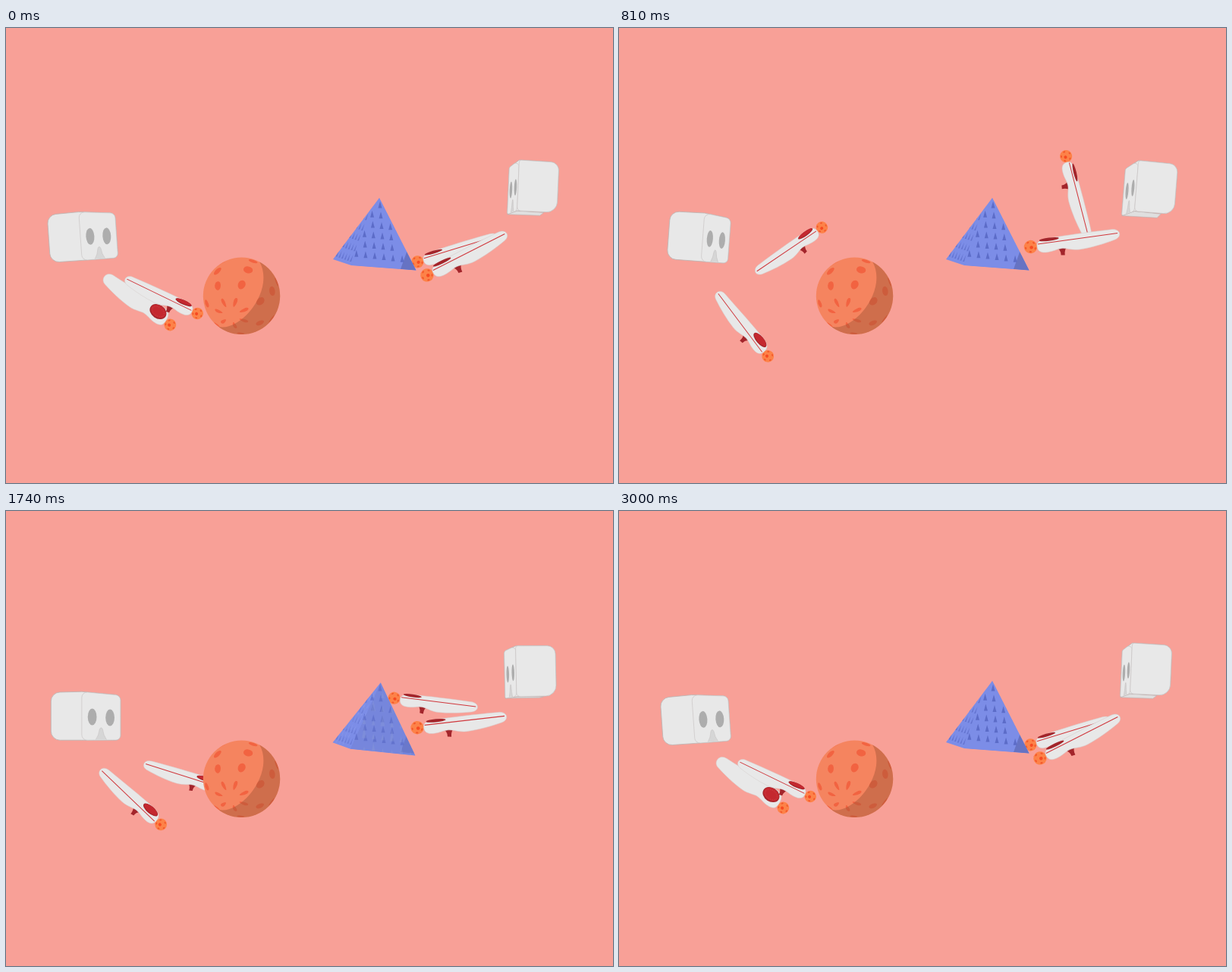
An HTML page with a canvas that plays this animation: 800x600 px, repeating every 3.03 s.

```html
<!DOCTYPE html>
<html lang="en">
<head>
<meta charset="utf-8">
<title>Two headsets, a sphere and a pyramid</title>
<style>
html, body { margin: 0; width: 100%; height: 100%; overflow: hidden; background: #f8a097; }
canvas { display: block; width: 800px; height: 600px; }
</style>
</head>
<body>
<canvas id="stage" width="800" height="600"></canvas>
<script>
const ctx = document.getElementById('stage').getContext('2d');
const LOOP = 3030, STEP = 30, TAU = 2 * Math.PI, RAD = Math.PI / 180;
const WHITE = '#e8e8e8', EDGE = '#b9b3b2', SEAM = '#c4c0c0';
const RED = '#c4282f', DARK_RED = '#a3252b';

// Key times shared by all moving parts; a plain number is a channel at rest.
const TIMES = [0, 510, 1140, 1500, 2010, 2490, 3000];

// x, y: middle of the edge between face and side; tilt in degrees; yaw in radians.
const leftHead = {
  facing: 1, depth: 49, tall: 64,
  x: [98, 112.5, 107, 105, 95, 102.5], y: [274.5, 277, 273.5, 269.5, 272, 277.5],
  tilt: [-4, 8, 0, 0, 0, 8], yaw: [.55, .395, .4, .48, .69, .58]
};
const rightHead = {
  facing: -1, depth: 53, tall: 67,
  x: [675, 677.5, 686, 674, 671.5, 673], y: [207.5, 209.5, 206.5, 209.5, 212.5, 211],
  tilt: [2.5, 2.5, 7, 1, -2.5, -1], yaw: [.14, .19, .16, .14, .2, .19]
};

// x, y: tail end; aim: degrees from tail to ball.
const leftNear = {
  side: -1, len: 108,
  x: [129, 130, 127, 124, 125, 126], y: [328, 330, 333, 340, 341, 333],
  aim: [36, 36, 43, 46, 38, 38]
};
const leftFar = {
  side: -1, len: 106, roll: .15,
  x: [157, 171, 185, 184, 177, 164], y: [330, 320, 327, 333, 332, 329],
  aim: [26, -65, 9, 19, 15, 10]
};
const rightFar = {
  side: 1, len: 111, roll: 0,
  x: [648, 620, 618, 606, 644, 650], y: [274, 278, 271, 256, 264, 286],
  aim: [162, 237, 263, 214, 168, 167]
};
const rightNear = {
  side: 1, len: 119, roll: 0, x: 660, y: 270,
  aim: [152, 152, 193, 176, 169, 157.5]
};

const mix = (a, b, u) => a + (b - a) * u;
const mixPt = (p, q, u) => [mix(p[0], q[0], u), mix(p[1], q[1], u)];
const clamp = x => Math.max(0, Math.min(1, x));
const smooth = x => { x = clamp(x); return x * x * (3 - 2 * x); };

// Monotone cubic through the keys, at rest where the loop closes.
function curve(keys, t) {
  if (!Array.isArray(keys)) return keys;
  const v = [...keys, keys[0]], last = v.length - 1;
  const slope = i => (v[i + 1] - v[i]) / (TIMES[i + 1] - TIMES[i]);
  const tangent = i => {
    if (i === 0 || i === last) return 0;
    const a = slope(i - 1), b = slope(i);
    return a * b <= 0 ? 0 : 2 * a * b / (a + b);
  };
  let i = 0;
  while (i < last - 1 && t > TIMES[i + 1]) i++;
  const span = TIMES[i + 1] - TIMES[i], u = clamp((t - TIMES[i]) / span);
  return mix(v[i], v[i + 1], smooth(u))
    + span * u * (1 - u) * ((1 - u) * tangent(i) - u * tangent(i + 1));
}

function poseAt(part, t) {
  const pose = {};
  for (const key in part) pose[key] = curve(part[key], t);
  return pose;
}

function paint(fill, stroke, width = .6) {
  if (fill) { ctx.fillStyle = fill; ctx.fill(); }
  if (stroke) { ctx.strokeStyle = stroke; ctx.lineWidth = width; ctx.stroke(); }
}

function poly(pts) {
  ctx.beginPath();
  pts.forEach(p => ctx.lineTo(...p));
  ctx.closePath();
}

function rounded(pts, radii) {
  const n = pts.length;
  ctx.beginPath();
  ctx.moveTo(...mixPt(pts[n - 1], pts[0], .5));
  pts.forEach((p, i) => ctx.arcTo(...p, ...pts[(i + 1) % n], radii[i]));
  ctx.closePath();
}

function oval(x, y, rx, ry, deg = 0) {
  ctx.beginPath();
  ctx.ellipse(x, y, rx, ry, deg * RAD, 0, TAU);
}

// A turned box: the face is as wide as the sine of the yaw, the side as the cosine.
function drawHead({ x, y, tilt, yaw, facing, depth, tall }) {
  const onLeft = facing > 0;
  const c = Math.cos(tilt * RAD), s = Math.sin(tilt * RAD);
  const put = (px, py) => [x + px * c - py * s, y + px * s + py * c];
  const edge = (px, mid, h) => [put(px, mid - h / 2), put(px, mid + h / 2)];
  const face = edge(facing * 91 * Math.sin(yaw), onLeft ? 2.3 : 5.5 + .95 * tilt, tall - 5);
  const seam = edge(0, 0, tall);
  const back = edge(-facing * depth * Math.cos(yaw), .5, tall - 1);
  const [l, r] = onLeft ? [back, face] : [face, back];
  const hull = [l[0], seam[0], r[0], r[1], seam[1], l[1]];
  const front = onLeft ? [seam[0], face[0], face[1], seam[1]] : [face[0], seam[0], seam[1], face[1]];

  if (!onLeft) {
    const k = clamp((face[1][1] - seam[1][1]) / 7), q = mixPt(seam[1], back[1], .67);
    poly([face[1], [q[0] - 5, q[1] + 7 * k], [q[0], q[1] + 1], seam[1]]);
    paint('#dfdfdf', EDGE);
  }
  rounded(hull, onLeft ? [12, 4, 7, 6, 3, 12] : [4, 3, 11, 14, 3, 1.5]);
  paint(WHITE, EDGE, .8);
  rounded(front, onLeft ? [7, 7, 6, 7] : [4, 4, 6, 1.5]);
  paint(WHITE, SEAM);
  if (!onLeft) {
    rounded(hull.slice(1, 5), [3, 11, 14, 5]);
    paint(WHITE, SEAM);
  }

  const at = (u, v) => mixPt(mixPt(front[0], front[1], u), mixPt(front[3], front[2], u), v);
  for (const u of [.27, .73]) {
    oval(...at(u, .51), Math.max(1.7, 10.5 * Math.sin(yaw)), 11, tilt);
    paint('#adadad');
  }
  ctx.beginPath();
  ctx.moveTo(...at(.36, .99));
  ctx.quadraticCurveTo(...at(.44, .9), ...at(.46, .77));
  ctx.quadraticCurveTo(...at(.5, .7), ...at(.54, .77));
  ctx.quadraticCurveTo(...at(.56, .9), ...at(.64, .99));
  paint('#d6d6d6', '#bebaba', .5);
}

function drawBall() {
  oval(0, 0, 8.7, 8.7);
  paint('#fd8248');
  oval(1, 1, 2.3, 2.2);
  paint('#f64a22');
  for (let i = 0; i < 5; i++) {
    const a = i * TAU / 5 + .5;
    oval(6.6 * Math.cos(a), 6.6 * Math.sin(a), 1.1, 1.7, a / RAD);
    paint('#f4582c');
  }
}

// Local axis runs from the ball to the tail; the trigger is on the positive side.
function drawWand({ x, y, aim, len, side, roll }) {
  const a = aim * RAD, s = len / 119;
  ctx.save();
  ctx.translate(x + len * Math.cos(a), y + len * Math.sin(a));
  ctx.rotate(a + Math.PI);
  ctx.scale(s, side * s);
  drawBall();

  const pull = 1 - smooth((roll - .45) / .5);
  ctx.beginPath();
  ctx.moveTo(33, 6);
  ctx.quadraticCurveTo(39, 7 + 3 * pull, 38, 7 + 10 * pull);
  ctx.lineTo(43, 7 + 11 * pull);
  ctx.quadraticCurveTo(43, 7 + 4 * pull, 48, 7);
  ctx.closePath();
  paint(DARK_RED);

  const head = -7.5 - 8.5 * roll, tail = -6 - 4 * roll;
  ctx.beginPath();
  ctx.moveTo(8.5, 1);
  ctx.bezierCurveTo(8.5, head + 1, 16, head, 28, head);
  ctx.bezierCurveTo(50, head, 75, tail - 1.5, 108, tail);
  ctx.bezierCurveTo(121, tail, 122, 6, 111, 8);
  ctx.bezierCurveTo(97, 11, 80, 13.5, 64, 13.5);
  ctx.bezierCurveTo(53, 13.5, 46, 8.5, 40, 8.5);
  ctx.bezierCurveTo(32, 8.5, 30, 10.5, 21, 10.5);
  ctx.bezierCurveTo(12, 10.5, 8.5, 7, 8.5, 1);
  paint(WHITE, '#d5cccb', .5);

  const by = -6 + .8 * roll;
  oval(25.5, by, 13, 2.1 + 8.2 * roll, 2);
  paint(DARK_RED);
  if (roll > .1) {
    oval(25.5, by - .6, 12, 1.3 + 7.8 * roll, 2);
    paint(RED);
  }
  if (roll > .7) {
    ctx.setLineDash([1, 2]);
    oval(25.5, by, 9.5, 6.5 * roll);
    paint(null, '#d9565a', .7);
    ctx.setLineDash([]);
  }
  ctx.globalAlpha = 1 - smooth((roll - .42) / .35);
  ctx.beginPath();
  ctx.moveTo(10, -2 + 12 * roll);
  ctx.lineTo(116, 0);
  paint(null, '#d0383d', 1.1);
  ctx.restore();
}

// Spots sit on rings of latitude around a pole that leans towards the viewer.
function drawSphere() {
  const cx = 310.5, cy = 353.3, r = 50.7, size = .125;
  const pole = [-.27, .49, .83], up = [-.152, -.871, .467], across = [.952, 0, .309];
  const onBall = (lat, lon) => pole.map((p, i) => p * Math.cos(lat)
    + Math.sin(lat) * (up[i] * Math.cos(lon) + across[i] * Math.sin(lon)));

  ctx.save();
  oval(cx, cy, r, r);
  paint('#f5845f');
  ctx.clip();
  for (let ring = 0; ring < 4; ring++) {
    const lat = (21 + 28.5 * ring) * RAD;
    for (let k = 0; k < 7; k++) {
      const lon = 23 * RAD + k * TAU / 7;
      if (onBall(lat, lon)[2] < 0) continue;
      const rim = [];
      for (let a = 0; a < TAU; a += TAU / 24) {
        const [x, y] = onBall(lat + size * Math.cos(a), lon + size * Math.sin(a));
        rim.push([cx + r * x, cy + r * y]);
      }
      poly(rim);
      paint('#f26341');
    }
  }
  ctx.beginPath();
  ctx.moveTo(281, 394);
  ctx.bezierCurveTo(310, 400, 355, 345, 334, 308);
  ctx.lineTo(370, 300);
  ctx.lineTo(370, 410);
  ctx.lineTo(281, 410);
  ctx.closePath();
  paint('rgba(160,82,54,.45)');
  ctx.restore();
}

function spike(x, y, half, high, lean, fill) {
  poly([[x - half, y], [x + lean, y - high], [x + half, y]]);
  paint(fill);
}

function drawPyramid(turn) {
  const apex = mixPt([492, 224], [497.5, 231], turn);
  const left = mixPt([431, 305], [429.5, 305.5], turn);
  const mid = mixPt([455, 313], [451.5, 315.5], turn);
  const right = mixPt([540.5, 319.5], [537, 329], turn);
  const rgb = [[124, 104], [141, 118], [231, 197]].map(c => Math.round(mix(...c, turn)));

  poly([apex, left, mid, right]);
  paint('#7c8de7');
  ctx.save();
  ctx.clip();
  poly([apex, mid, right]);
  paint(`rgb(${rgb})`);

  ctx.globalAlpha = 1 - turn;
  poly([[529, 293], [541, 320], [520, 318]]);
  paint('#6673c3');
  for (let r = 0; r < 6; r++) {
    const y = 237.5 + 13.7 * r;
    for (let k = -3; k < 4; k++) {
      const x = 493 + r + k * (11.3 + .15 * r);
      if (x < 486 - r * 5.2 || x > 497 + r * 5.5) continue;
      spike(x, y + k * 1.4, 2.5, 9, 0, '#5c6cc8');
    }
    for (let j = 0; j < 7; j++) {
      spike(479 - r * 5 - j * 3.7, y + 2 - j * 1.3, 1, 9, 3.5, '#6474d0');
    }
  }

  ctx.globalAlpha = turn;
  for (let k = 0; k < 6; k++) {
    for (let r = 0; r < 5; r++) {
      const tall = (k + 2 * r) % 3 === 0;
      spike(472 + 12.2 * k, 244 + 18.5 * r + 1.4 * k, tall ? 3 : 2.4, tall ? 15 : 8, 0, '#8c9bd5');
    }
  }
  poly([apex, left, mid]);
  ctx.clip();
  for (let r = 0; r < 7; r++) {
    for (let j = 0; j < 4; j++) {
      spike(487 - 7.2 * r - 4.5 * j, 252 + 9.3 * r - j, .8, 8, 4.5, '#98a7f0');
    }
  }
  ctx.restore();
}

// The near left wand dips once and rolls towards the viewer around the loop point.
function leftNearAt(t) {
  const pose = poseAt(leftNear, t);
  const dip = Math.exp(-(((t - 810) / 130) ** 2));
  pose.aim += 13 * dip;
  pose.y += 17 * dip;
  pose.roll = .4 + .65 * ((1 + Math.cos(TAU * (t + 200) / LOOP)) / 2) ** 4;
  return pose;
}

function draw(t) {
  ctx.fillStyle = '#f8a097';
  ctx.fillRect(0, 0, 800, 600);
  drawHead(poseAt(leftHead, t));
  drawHead(poseAt(rightHead, t));
  drawWand(leftNearAt(t));
  drawWand(poseAt(leftFar, t));
  drawSphere();
  drawWand(poseAt(rightFar, t));
  drawWand(poseAt(rightNear, t));
  drawPyramid(smooth((t - 1220) / 240) * (1 - smooth((t - 1540) / 320)));
}

const start = performance.now();
function tick() {
  const t = Math.max(0, performance.now() - start) % LOOP;
  draw(Math.floor(t / STEP) * STEP);
  requestAnimationFrame(tick);
}
tick();
</script>
</body>
</html>
```
